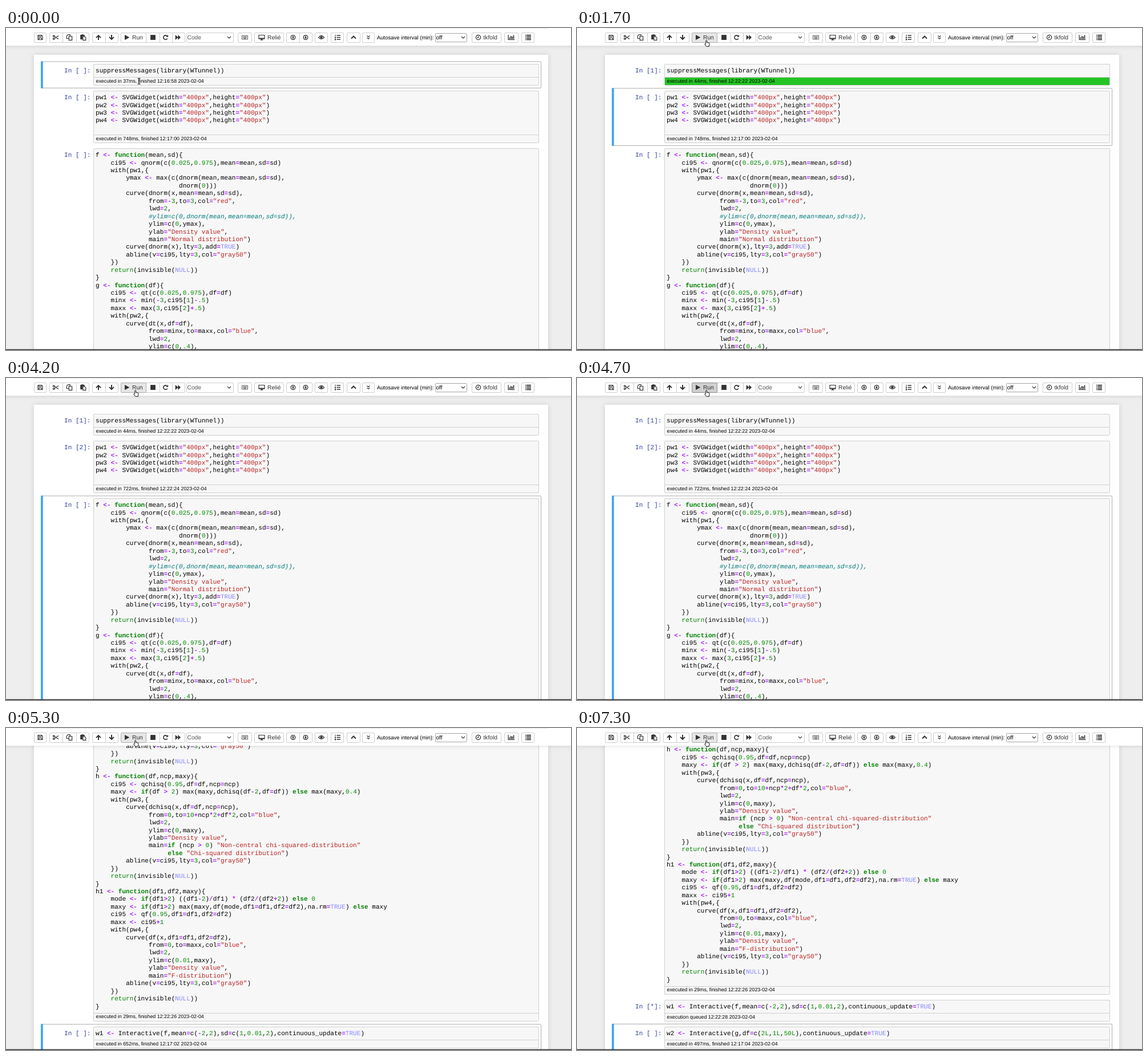
Write an HTML page that moves like this. It is 990x565 px and loops after 8000 ms.

```html
<!DOCTYPE html>
<html lang="en">
<head>
<meta charset="utf-8">
<title>Notebook run</title>
<style>
html, body { margin: 0; width: 100%; height: 100%; overflow: hidden; background: #eee; }
svg { display: block; }
text { white-space: pre; text-rendering: geometricPrecision; }
.code, .prompt { font: 11.06px "Liberation Mono", monospace; }
.prompt { fill: #303f9f; }
.status { font: 8.85px "Liberation Sans", sans-serif; }
.ui { font: 10.27px "Liberation Sans", sans-serif; fill: #333; }
.kw { fill: #008000; font-weight: bold; }
.fn { fill: #008000; }
.atom { fill: #8888ff; }
.num { fill: #008800; }
.str { fill: #ba2121; }
.op { fill: #aa22ff; font-weight: bold; }
.note { fill: #007979; font-style: italic; }
.shade { filter: drop-shadow(0 0 4.5px rgba(87,87,87,.22)); }
.line { fill: none; stroke: #333; stroke-width: 1.2; }
.solid { fill: #333; }
</style>
</head>
<body>
<svg id="stage" width="990" height="565" viewBox="0 0 990 565"></svg>
<script>
const stage = document.getElementById('stage');

function add(parent, tag, attrs = {}, text) {
  const el = document.createElementNS('http://www.w3.org/2000/svg', tag);
  for (const k in attrs) el.setAttribute(k, attrs[k]);
  if (text !== undefined) el.textContent = text;
  parent.append(el);
  return el;
}
const set = (el, attrs) => { for (const k in attrs) el.setAttribute(k, attrs[k]); };
const box = (parent, x, y, width, height, more) =>
  add(parent, 'rect', { x, y, width, height, ...more });

/* ---------- notebook ---------- */
const LINE = 13.434;
const sources = [
`suppressMessages(library(WTunnel))`,
`pw1 <- SVGWidget(width="400px",height="400px")
pw2 <- SVGWidget(width="400px",height="400px")
pw3 <- SVGWidget(width="400px",height="400px")
pw4 <- SVGWidget(width="400px",height="400px")
`,
`f <- function(mean,sd){
    ci95 <- qnorm(c(0.025,0.975),mean=mean,sd=sd)
    with(pw1,{
        ymax <- max(c(dnorm(mean,mean=mean,sd=sd),
                      dnorm(0)))
        curve(dnorm(x,mean=mean,sd=sd),
              from=-3,to=3,col="red",
              lwd=2,
              #ylim=c(0,dnorm(mean,mean=mean,sd=sd)),
              ylim=c(0,ymax),
              ylab="Density value",
              main="Normal distribution")
        curve(dnorm(x),lty=3,add=TRUE)
        abline(v=ci95,lty=3,col="gray50")
    })
    return(invisible(NULL))
}
g <- function(df){
    ci95 <- qt(c(0.025,0.975),df=df)
    minx <- min(-3,ci95[1]-.5)
    maxx <- max(3,ci95[2]+.5)
    with(pw2,{
        curve(dt(x,df=df),
              from=minx,to=maxx,col="blue",
              lwd=2,
              ylim=c(0,.4),
              ylab="Density value",
              main="t-distribution")
        curve(dnorm(x),lty=3,add=TRUE)
        abline(v=ci95,lty=3,col="gray50")
    })
    return(invisible(NULL))
}
h <- function(df,ncp,maxy){
    ci95 <- qchisq(0.95,df=df,ncp=ncp)
    maxy <- if(df > 2) max(maxy,dchisq(df-2,df=df)) else max(maxy,0.4)
    with(pw3,{
        curve(dchisq(x,df=df,ncp=ncp),
              from=0,to=10+ncp*2+df*2,col="blue",
              lwd=2,
              ylim=c(0,maxy),
              ylab="Density value",
              main=if (ncp > 0) "Non-central chi-squared-distribution"
                   else "Chi-squared distribution")
        abline(v=ci95,lty=3,col="gray50")
    })
    return(invisible(NULL))
}
h1 <- function(df1,df2,maxy){
    mode <- if(df1>2) ((df1-2)/df1) * (df2/(df2+2)) else 0
    maxy <- if(df1>2) max(maxy,df(mode,df1=df1,df2=df2),na.rm=TRUE) else maxy
    ci95 <- qf(0.95,df1=df1,df2=df2)
    maxx <- ci95+1
    with(pw4,{
        curve(df(x,df1=df1,df2=df2),
              from=0,to=maxx,col="blue",
              lwd=2,
              ylim=c(0.01,maxy),
              ylab="Density value",
              main="F-distribution")
        abline(v=ci95,lty=3,col="gray50")
    })
    return(invisible(NULL))
}`,
`w1 <- Interactive(f,mean=c(-2,2),sd=c(1,0.01,2),continuous_update=TRUE)`,
`w2 <- Interactive(g,df=c(2L,1L,50L),continuous_update=TRUE)`
];
const tops = [58.6, 105.5, 206.5, 1100.5, 1147];

const words = { function: 'kw', if: 'kw', else: 'kw', return: 'fn', TRUE: 'atom', NULL: 'atom' };
const tokens = /(?<str>"[^"]*")|(?<note>#.*)|(?<word>[A-Za-z][\w.]*)|(?<num>\d*\.?\d+L?)|(?<op><-|[-=+*\/<>])|[^]/g;

function codeLine(parent, y, source) {
  const text = add(parent, 'text', { class: 'code', x: 157, y });
  for (const { 0: part, groups } of source.matchAll(tokens)) {
    const kind = groups.word ? words[part] : ['str', 'note', 'num', 'op'].find(k => groups[k]);
    add(text, 'tspan', kind ? { class: kind } : {}, part);
  }
}

function makeCell(top, source) {
  const lines = source.split('\n');
  const areaTop = top + 4.8;
  const base = areaTop + 14.86;
  const sep = areaTop + 9.6 + lines.length * LINE;
  const y = Math.round(areaTop) + .5, rowY = Math.round(sep) + .5;
  const bottom = rowY + 14;
  box(page, 153.5, y, 780, bottom - y, { rx: 1.6, fill: '#f7f7f7', stroke: '#cfcfcf' });
  const flash = box(page, 154, rowY, 779, bottom - rowY - .5, { fill: '#00bb00' });
  add(page, 'path', { d: `M154 ${rowY}H933`, stroke: '#cfcfcf' });
  lines.forEach((s, i) => codeLine(page, Math.round(base + i * LINE), s));
  return {
    top: top + .4, flash, bottom: bottom + 4.8,
    prompt: add(page, 'text', { class: 'prompt', x: 102, y: Math.round(base) }),
    status: add(page, 'text', { class: 'status', x: 157.5, y: Math.round(sep + 9.7) })
  };
}

box(stage, 0, 0, 990, 565, { fill: '#eee' });
const page = add(stage, 'g');
box(page, 49, 47, 901, 1500, { fill: '#fff', class: 'shade' });
const frame = box(page, 61.5, 0, 876, 0, { rx: 1.6, fill: '#fff', stroke: '#ababab' });
const marker = box(page, 61, 0, 3.8, 0, { fill: '#42a5f5' });
const cells = tops.map((top, i) => makeCell(top, sources[i]));

/* ---------- toolbar ---------- */
box(stage, -20, -20, 1030, 51, { fill: '#fff', class: 'shade' });
box(stage, 49, 0, 901, 1, { fill: '#e7e7e7' });

function buttons(left, right, ...dividers) {
  const r = box(stage, left + .5, 8.5, right - left - 1, 17, { rx: 1.6, fill: '#fff', stroke: '#ccc' });
  for (const x of dividers) add(stage, 'path', { d: `M${x + .5} 9V25`, stroke: '#ccc' });
  return r;
}
function icon(x, d, kind = 'solid', turn = 0) {
  return add(stage, 'path', { d, class: kind, transform: `translate(${x} 16.5) rotate(${turn})` });
}
const label = (x, text, more) => add(stage, 'text', { class: 'ui', x, y: 20, ...more }, text);
const ring = r => `M${-r} 0a${r} ${r} 0 1 1 ${2 * r} 0a${r} ${r} 0 1 1 ${-2 * r} 0z`;
const arrow = 'M0-4.8 4.7-.1 3.3 1.3 1 -.9V4.5H-1V-.9L-3.3 1.3-4.7-.1z';

buttons(49, 71);
icon(60, 'M-4-4H2.4L4-2.4V4H-4zM-2.2-4V-1.3H1.6V-4M-2.2 4V1H2.2V4', 'line');

buttons(76, 146, 99, 123);
icon(87, 'M-1.6-1.4 5 3M-1.6 1.4 5-3M-1.7-2.4a1.5 1.3 0 1 1-3 0a1.5 1.3 0 1 1 3 0zM-1.7 2.4a1.5 1.3 0 1 1-3 0a1.5 1.3 0 1 1 3 0z', 'line');
icon(111, 'M-.8-2H4.6V4.8H-.8zM-1 2H-4.6V-2.6L-2.4-4.8H1.2V-2', 'line');
icon(135, 'M-4.8-4.4H-2.8V-5.2H.8V-4.4H2.8V-2H-1V3.4H-4.8z');
icon(135, 'M-.2-1.4H3L4.8.4V4.8H-.2z', 'line');

buttons(151, 197, 174);
icon(162, arrow);
icon(185, arrow, 'solid', 180);

buttons(201, 314, 269, 291);
const run = buttons(201, 246);
icon(212, 'M-4-4.6 4.4 0-4 4.6z');
label(221, 'Run');
icon(257.5, 'M-4.4-4.4H4.4V4.4H-4.4z');
icon(279.5, 'M3.3 1.9A3.7 3.7 0 1 1 2.4-2.8', 'line').style.strokeWidth = 1.6;
icon(279.5, 'M4.6-4.8V-.8H.6z');
icon(301.5, 'M-4.8-4.4-.2-.2V-4.4L4.6 0-.2 4.4V.2L-4.8 4.4z');

buttons(316, 399);
label(317.5, 'Code', { style: 'fill:#555' });
icon(391, 'M-3-1.5 0 1.5 3-1.5', 'line');

buttons(406, 431);
icon(418.5, 'M-5-3.3H5V3.3H-5zM-3.5-1.3H3.6M-3.5.3H3.6M-2.4 1.9H2.4', 'line').style.strokeWidth = .8;

buttons(435, 487);
icon(448, 'M-5-4H5V2.3H-5z', 'line');
icon(448, 'M-5 1H5V2.6H1.2V4H2.6V5H-2.6V4H-1.2V2.6H-5z');
label(458, 'Relié');

buttons(491, 537, 514);
for (const [x, turn] of [[503, 0], [525, 180]]) {
  icon(x, ring(3.9), 'line');
  icon(x, 'M0-2.6 2.5 0H.8V2.4H-.8V0H-2.5z', 'solid', turn);
}

buttons(541, 564);
icon(552.5, 'M-5 0Q0-6.4 5 0Q0 6 -5 0z', 'line');
icon(552.5, ring(2.2));

buttons(569, 592);
icon(581, 'M-1.5-3.4H5M-1.5 0H5M-1.5 3.4H5', 'line').style.strokeWidth = 1.5;
icon(581, 'M-4.4-5H-3.4V-2H-4.4zM-5-1.1H-3V1.2H-5zM-5 2.2H-3V5H-5z');

buttons(597, 621);
icon(609, 'M-4 2 0-2 4 2', 'line').style.strokeWidth = 2;
buttons(624, 646);
icon(635, 'M-2.5-3 0-.7 2.5-3M-2.5.4 0 2.7 2.5.4', 'line');

label(650, 'Autosave interval (min):', { style: 'font-size:9.48px;fill:#000' });
box(stage, 752.5, 9.5, 55, 15, { rx: 1, fill: '#fff', stroke: '#a5a5a5' });
label(753.5, 'off', { style: 'font-size:10px;fill:#000' });
icon(801, 'M-3-1.5 0 1.5 3-1.5', 'line');

buttons(816, 868);
icon(827.5, ring(4.1) + 'M0-2.4V.6H-2', 'line');
label(836.5, 'tkfold');

buttons(873, 898);
icon(885.5, 'M-5.4-4.5V4H5.8', 'line');
icon(885.5, 'M-4 0H-2.4V3H-4zM-1.6-2.6H0V3H-1.6zM.8-1.4H2.4V3H.8zM3.2-4H4.8V3H3.2z');

buttons(903, 926);
icon(915, 'M-2.8-3.9H5M-2.8-1.3H5M-2.8 1.3H5M-2.8 3.9H5M-5-3.9H-3.6M-5-1.3H-3.6M-5 1.3H-3.6M-5 3.9H-3.6', 'line').style.strokeWidth = 1.6;

box(stage, 0, 563.6, 990, 1.4, { fill: '#333' });

/* ---------- pointer ---------- */
const pointers = {
  beam: add(stage, 'path', { d: 'M-2.5-5Q0-5 0-3.6Q0-5 2.5-5M0-4V4.5M-2.5 5.5Q0 5.5 0 4Q0 5.5 2.5 5.5', fill: 'none', stroke: '#111', 'stroke-width': 1.1 }),
  arrow: add(stage, 'path', { d: 'M0 0V11L2.6 8.7 4.3 12.4 6 11.6 4.4 8H7.8z', fill: '#111', stroke: '#fff', 'stroke-width': .7 }),
  hand: add(stage, 'path', { d: 'M2.7 6.6V1.6a1 1 0 0 1 2 0V4.4L8 5.1Q9.2 5.4 9.1 6.6L8.3 11.3H3.6L.7 7.6Q.8 5.9 2.7 7.2', fill: '#fff', stroke: '#111', 'stroke-width': 1 })
};
const runLooks = {
  idle: ['#fff', '#ccc'], hover: ['#e6e6e6', '#adadad'],
  down: ['#d0d0d0', '#8c8c8c'], focus: ['#e6e6e6', '#adadad']
};

/* ---------- timeline: each step changes part of the state ---------- */
const done = (span, time) => `executed in ${span}ms, finished ${time} 2023-02-04`;
const queued = time => `execution queued ${time} 2023-02-04`;
const steps = [
  [0, { pointer: 'beam', x: 233, y: 93, run: 'idle', selected: 0, scroll: 0, flashed: 0, flash: 0,
    n0: ' ', n1: ' ', n2: ' ', n3: ' ', n4: ' ',
    s0: done(37, '12:16:58'), s1: done(748, '12:17:00'), s2: done(31, '12:17:00'),
    s3: done(652, '12:17:02'), s4: done(497, '12:17:04') }],
  [400, { y: 82 }],
  [500, { pointer: 'arrow', x: 230, y: 52 }],
  [600, { x: 228, y: 33 }],
  [700, { pointer: 'hand', x: 224.5, y: 22, run: 'hover' }],
  [900, { x: 223, y: 21 }],
  [1400, { run: 'down' }],
  [1600, { run: 'focus', selected: 1, n0: '*', s0: queued('12:22:22') }],
  [1700, { n0: 1, s0: done(44, '12:22:22'), flash: .85 }],
  [1800, { flash: .55 }],
  [1900, { flash: .2 }],
  [2000, { flash: 0 }],
  [4200, { selected: 2, n1: 2, s1: done(722, '12:22:24') }],
  [4700, { run: 'down' }],
  [4800, { run: 'focus', selected: 3, scroll: 581, n2: 3, s2: queued('12:22:26') }],
  [5000, { s2: done(29, '12:22:26'), flashed: 2, flash: .8 }],
  [5200, { flash: .3 }],
  [5300, { flash: 0 }],
  [7100, { run: 'down' }],
  [7300, { run: 'focus', selected: 4, scroll: 628, n3: '*', s3: queued('12:22:28') }]
];
let state = {};
const states = steps.map(([at, change]) => ({ ...(state = { ...state, ...change }), at }));

function show(s) {
  const { top, bottom } = cells[s.selected];
  set(page, { transform: `translate(0 ${-s.scroll})` });
  set(frame, { y: top, height: bottom - top });
  set(marker, { y: top - .5, height: bottom - top + 1 });
  cells.forEach((cell, i) => {
    cell.prompt.textContent = `In [${s['n' + i]}]:`;
    cell.status.textContent = s['s' + i];
    set(cell.flash, { opacity: i === s.flashed ? s.flash : 0 });
  });
  const [fill, stroke] = runLooks[s.run];
  set(run, { fill, stroke });
  for (const kind in pointers) {
    set(pointers[kind], {
      transform: `translate(${s.x} ${s.y})`,
      visibility: kind === s.pointer ? 'visible' : 'hidden'
    });
  }
}

const start = performance.now();
let shown;
function tick() {
  const time = (performance.now() - start) % 8000;
  const now = states.findLast(s => s.at <= time);
  if (now !== shown) show(shown = now);
  requestAnimationFrame(tick);
}
tick();
</script>
</body>
</html>
```
